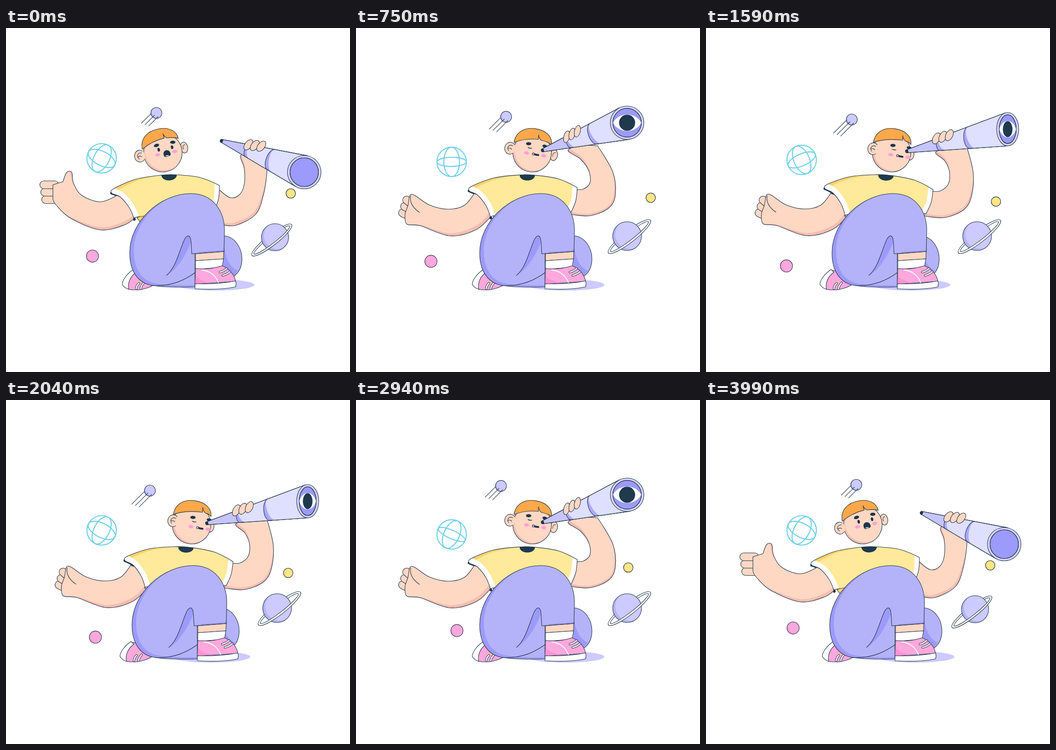
These frames come from a looping animation (748x748 px, 4020 ms). An HTML page with a canvas:

```html
<!DOCTYPE html>
<html lang="en">
<head>
<meta charset="utf-8">
<title>Stargazer</title>
<style>
html, body { margin: 0; width: 100%; height: 100%; overflow: hidden; background: #fff; }
canvas { display: block; width: 100vw; height: 100vh; }
</style>
</head>
<body>
<canvas id="stage" width="748" height="748"></canvas>
<script>
const ctx = document.getElementById('stage').getContext('2d');
const LOOP = 4020, STEP = 30, TAU = Math.PI * 2;
const INK = '#1e3448', NAVY = '#1f3a4d', SKIN = '#ffd8c4', BLUSH = '#f7bdb1', LILAC = '#b4b3f9',
  VIOLET = '#9c9afa', PALE = '#cccaff', PINK = '#ffa8de', YELLOW = '#ffe99a', AMBER = '#ffd36c';
const rad = d => d * Math.PI / 180;

// Pose weights: away = scope lowered, side = turned right, dip = sink between poses
let away, side, dip;
const ease = (t, from, to) => {
  const u = Math.min(1, Math.max(0, (t - from) / (to - from)));
  return u * u * (3 - 2 * u);
};
function setPose(t) {
  away = 1 - ease(t, 30, 530) + ease(t, 3240, 3760);
  side = ease(t, 960, 1440) - ease(t, 2160, 2670);
  dip = 4 * away * (1 - away) + 4 * side * (1 - side);
}
const mix = (down, look, turn = look) => look + away * (down - look) + side * (turn - look);

// Drawing helpers
function paint(path, fill, line = INK, width = 1.1) {
  if (fill) { ctx.fillStyle = fill; ctx.fill(path); }
  if (line) { ctx.strokeStyle = line; ctx.lineWidth = width; ctx.stroke(path); }
}
const draw = (d, fill, line, width) => paint(new Path2D(d), fill, line, width);
function oval(x, y, rx, ry = rx, turn = 0, from = 0, to = TAU) {
  const p = new Path2D();
  p.ellipse(x, y, rx, ry, turn, from, to);
  return p;
}
function local(fn, x = 0, y = 0, turn = 0) {
  ctx.save();
  ctx.translate(x, y);
  ctx.rotate(turn);
  fn();
  ctx.restore();
}
// Smooth line through [x, y] points; listed corners stay sharp
function curve(pts, corners = [], closed = true) {
  const n = pts.length, p = new Path2D();
  const idx = i => closed ? (i + n) % n : Math.min(n - 1, Math.max(0, i));
  const at = i => pts[idx(i)];
  const handle = (i, sign) => at(i).map((v, k) =>
    corners.includes(idx(i)) ? v : v + sign * (at(i + 1)[k] - at(i - 1)[k]) / 6);
  p.moveTo(...at(0));
  for (let i = 0; i < (closed ? n : n - 1); i++)
    p.bezierCurveTo(...handle(i, 1), ...handle(i + 1, -1), ...at(i + 1));
  if (closed) p.closePath();
  return p;
}
// Fill with a shaded rim: the light copy is moved inside the clipped shape
function shaded(path, light, dark, { x = 0, y = 0, turn = 0, pivot = [0, 0] }, extra) {
  local(() => {
    ctx.clip(path);
    paint(path, dark, null);
    local(() => {
      ctx.translate(pivot[0] + x, pivot[1] + y);
      ctx.rotate(turn);
      ctx.translate(-pivot[0], -pivot[1]);
      paint(path, light, null);
    });
    if (extra) extra();
  });
  paint(path);
}

// Floating objects drift on closed orbits
const ball = (x, y, r, light, dark) => shaded(oval(x, y, r), light, dark, { x: r * .18, y: -r * .12 });
const wave = (t, mid, size, phase, turns = 1) => mid + size * Math.cos(TAU * turns * t / LOOP + rad(phase));

function globe(t) {
  const y = wave(t, 288, -4.5, 0, 2), roll = rad(wave(t, 0, 27, 0, 4));
  const flat = 32 * wave(t, .38, .1, 0, 2);
  for (const path of [oval(208, y, 32), oval(208, y, 32, flat, roll), oval(208, y, 17, 32, roll)])
    paint(path, null, '#6ccfe9', 2.2);
}
function comet(t) {
  const x = wave(t, 320, 8, -30), y = wave(t, 191, -8, 38), len = wave(t, 24, -4, 30);
  ball(x, y, 12, PALE, '#aaa7f8');
  for (let i = 0; i < 3; i++)
    draw(`M${x - 12 + 8 * i} ${y + 2 + 3 * i}l${-len} ${len}`);
}
function planet() {
  const r = 31.3 - 2 * dip - 1.8 * away;
  const ring = () => {
    const outer = [0, 0, r * 1.85, r * .4], inner = [0, 0, r * 1.67, r * .25];
    const band = oval(...outer);
    band.addPath(oval(...inner));
    ctx.fillStyle = '#fff';
    ctx.fill(band, 'evenodd');
    paint(oval(...outer));
    paint(oval(...inner));
  };
  const spot = [594.5 - 16.5 * away, 453.5 - 4 * dip + 7.5 * away, rad(-38)];
  local(ring, ...spot);
  ball(589.5 - 4.5 * away, 452.5 + 2.5 * away, r, PALE, LILAC);
  local(() => {
    ctx.beginPath();
    ctx.rect(-80, 0, 160, 40);
    ctx.clip();
    ring();
  }, ...spot);
}
function space(t) {
  globe(t);
  comet(t);
  planet();
  ball(wave(t, 190.5, 29, 95), wave(t, 506, -11.5, 30), 13.3, PINK, '#ff94d4');
  ball(wave(t, 617, -25, 95), wave(t, 368, -9.5, 30), 10.3, '#ffe587', '#ffd569');
}

// Legs and shoes; the squash keeps the soles on the floor
function squash(fn) {
  local(() => {
    ctx.translate(0, 569);
    ctx.scale(1, 1 - .021 * dip);
    ctx.translate(0, -569);
    fn();
  });
}
function lace(d) {
  draw(d, null, INK, 4.6);
  draw(d, null, '#fff', 2.6);
}
function backLeg() {
  paint(oval(455 - 9 * side, 558.5, 85, 12.5), PALE, null);
  local(() => squash(() => {
    draw('M440 452L474 452C498 454 513 478 513 502C513 522 504 534 495 540L440 540Z', LILAC);
    draw('M474 470C476 500 487 521 505 528L495 539L472 539Z', VIOLET, null);
  }), -6 * side);
  local(() => {
    draw('M277 527C268 540 262 555 266 568C285 572 305 568 321 559L288 528Z', PINK);
    draw('M277 525C262 535 252 550 253 558C257 564 262 567 267 568C264 555 270 540 283 531Z', '#fff');
    draw('M285 553Q291 549 297 555', null, AMBER, 1.5);
    lace('M283 567Q284 560 289 555');
    lace('M293 567Q294 560 300 554');
  }, -5 * side);
}
const THIGH = new Path2D('M402 360C336 360 269 420 269 489C269 530 288 556 320 560C345 564 380 564 411 563L411 491L474 486L475 440C475 398 450 360 402 360Z');
function frontLeg() {
  local(() => {
    draw('M412 480L474 480L473 502L412 506Z', SKIN);
    squash(() => {
      shaded(THIGH, LILAC, VIOLET, { x: 9, y: -4 });
      draw('M349 538C370 521 377 483 388 460C394 449 401 448 402 466C393 488 376 523 349 538Z', VIOLET, null);
      draw('M474 486L404 491L402.500 466C401 448 394 449 388 460C377 483 370 521 349 538M320 560C362 562 390 547 411 532');
    });
    draw('M412 506L473 502L470 520L412 525Z', '#fff');
    draw('M412 523C432 525 452 523 470 517C488 524 498 540 499 551L411 557Z', PINK);
    draw('M412 538C420 549 436 554 458 553.500L411.500 556Z', '#ff93d4', null);
    draw('M426 526C446 529 456 539 462 554', null, '#fff', 1.8);
    draw('M411 556C440 557 470 556 499 550C501 555 500 560 499 563C470 569 440 569 411 567Z', '#fff');
    draw('M464 529L468 533M471 536L475 540', null, AMBER, 2);
    lace('M465 531Q473 529 480 523');
    lace('M471 538Q480 536 487 530');
  }, 5 * side);
}

// Arms: key points as [lowered x, y, looking x, y]; turning follows a rule
const pose = (keys, turn) => keys.map(([ax, ay, x, y]) => {
  const [tx, ty] = turn(x, y);
  return [mix(ax, x, x + tx), mix(ay, y, y + ty) + 3.5 * dip];
});
const LEFT_ARM = [
  [241, 364, 257, 360], [205, 378, 235, 386], [165, 364, 200, 394], [147, 338, 160, 385],
  [143, 314, 128, 364], [132, 314, 118, 363], [124, 334, 115, 374], [102, 341, 113, 386],
  [102, 372, 107, 402], [110, 386, 110, 426], [141, 414, 140, 430], [205, 439, 205, 452],
  [258, 428, 262, 438], [283, 410, 296, 406], [275, 378, 290, 372]];
const RIGHT_ARM = [
  [464, 352, 478, 351], [488, 369, 495, 350], [508, 362, 509, 336], [518, 340, 506, 310],
  [518, 305, 488, 285], [510, 278, 461, 266], [530, 270, 490, 254], [567, 295, 525, 256],
  [567, 318, 558, 312], [560, 362, 564, 362], [543, 405, 550, 391], [500, 429, 510, 408],
  [468, 427, 466, 405], [440, 400, 450, 385]];

function leftArm() {
  for (let i = 2; i >= 0; i--) {
    const x = mix(82 + 2 * i, 110 - 4.5 * i, 124 - 4.5 * i), y = mix(341 + 16 * i, 374 + 14 * i) + 3.5 * dip;
    const finger = `M${x} ${y}L${mix(106, 122, 136)} ${y + mix(0, 10)}`;
    draw(finger, null, INK, 18);
    draw(finger, null, SKIN, 15.8);
  }
  const arm = pose(LEFT_ARM, () => [14, -.5]);
  shaded(curve(arm, [0, 6, 7, 8, 13, 14]), SKIN, BLUSH, { turn: -.06, pivot: arm[9] });
  if (away < .5) {
    const [x, y] = arm[5];
    draw(`M${x + 1} ${y + 2}q-4 20 19 36`);
  }
}
function rightArm() {
  const arm = pose(RIGHT_ARM, (x, y) => [10 + 35 * ((410 - y) / 160) ** 2, 4]);
  shaded(curve(arm, [0, 6, 7, 12, 13]), SKIN, BLUSH, { turn: .07, pivot: arm[8] });
}

// Shirt: one shape that slides and tilts with the shoulders
const SHIRT = [[246, 354], [264, 363], [283, 387], [293, 413], [302, 408], [400, 400], [468, 400],
  [478, 375], [481, 347], [440, 328], [389, 320], [355, 319.5], [300, 326], [252, 344]];
function torso() {
  const cuff = curve(SHIRT.slice(0, 4), [], false), rightCuff = curve(SHIRT.slice(6, 9), [], false);
  const tilt = fn => local(() => {
    ctx.translate(370, 340);
    ctx.rotate(.04 * (side - away));
    ctx.translate(-370, -340);
    fn();
  }, 13 * side - 17 * away, 6 * dip);
  tilt(() => paint(cuff, null, INK, 6));
  leftArm();
  rightArm();
  tilt(() => {
    draw('M299 410L328 395L309 424Z', AMBER);
    shaded(curve(SHIRT, [3, 6, 8]), YELLOW, AMBER, { turn: -.075, pivot: SHIRT[11] }, () => {
      paint(cuff, null, '#fff', 23);
      paint(rightCuff, null, '#fff', 21);
      paint(oval(372.5 + 5 * side, 320.5, 16, 10.5), NAVY);
    });
  });
}

// Head, drawn around the face centre; features slide when it turns
function face() {
  const leftEar = mix(-50.5, -49, -41), rightEar = mix(47.5, 47.5, 41);
  paint(oval(rightEar, -2, 8, 12), SKIN);
  draw(`M${rightEar + 3} -8q-7 1 -5 9`);
  shaded(oval(0, 0, 42), SKIN, BLUSH, { x: 4, y: -3 });
  paint(oval(leftEar, -2, 11.5, 13), SKIN, null);
  paint(oval(leftEar, -2, 11.5, 13, 0, rad(50), rad(310)));
  draw(`M${leftEar + 5} -8c-9 -3 -13 6 -7 12M${leftEar - 4} -1q5 -3 8 1`);
  local(features, 11 * side, 2 * side);
  const n = 8 + 10.5 * side;
  draw(`M-42.500 -15.500C-42.500 -40 -24 -52.500 0 -52.500C22 -52.500 38 -42 39 -24Q${30 + 4 * side} -29 ${n + 7} -29.500Q${n + 1} -34 ${n} -40.500L${n + 1} -30.500Q-20 -29 -42.500 -15.500Z`, '#ffa84a');
}
function features() {
  for (const sign of [-1, 1]) {
    paint(oval(7 + 19 * sign, 2.5, 5.5, 3.6), '#ff9fd8', null);
    paint(oval(7.5 + 18 * sign, -18, 5.8, 3.4, rad(8 * sign)), INK, null);
    if (away > .1) paint(oval(7.2 + 14.8 * sign, -7.8, 2.7, 4), INK, null);
  }
  if (away <= .1) draw('M-10.500 -9.500q4 1.500 8 0', null, INK, 1.5);
  if (away > .5) {
    draw('M1 6C0 0 4 -4 9 -3.500C14 -3 17 2 16 7C15 11 10 9 6 10.500C3 11 1 9 1 6Z', INK, null);
    draw('M3.500 8.500C7 6.500 10 7 12.500 8.800C9 8.600 6 10 3.500 8.500Z', '#fff', null);
  } else {
    draw('M3 2.200q6 1.500 11 1', null, INK, 4);
    paint(oval(3, 2.5, 2.4), PINK, INK, 1);
  }
}

// Telescope and gripping fingers
function scope() {
  const tip = [mix(469, 406, 437), mix(245.5, 266, 268) + 6 * dip];
  const lens = [mix(648.5, 589.5, 656), 206 + 107.5 * away ** 1.5 + 14 * side + 8 * dip];
  const rx = 36.5 - 12.5 * side, ry = 36.3;
  const axis = Math.atan2(lens[1] - tip[1], lens[0] - tip[0]);
  // Point on the barrel edge: k runs from tip to lens, sign picks the side
  const edge = (k, sign) => {
    const n = axis + sign * (Math.PI / 2 + .165), dir = [Math.cos(n), Math.sin(n)];
    const m = Math.hypot(rx * dir[0], ry * dir[1]);
    return [rx, ry].map((r, i) => {
      const near = tip[i] + 3.3 * dir[i], far = lens[i] + r * r * dir[i] / m;
      return near + k * (far - near);
    });
  };
  // Barrel from a rounded joint to the lens; the joint may lean from k to k2
  const barrel = (k, k2, bulge) => {
    const a = edge(k, -1), b = edge(k2, 1), w = Math.hypot(a[0] - b[0], a[1] - b[1]) * bulge;
    const ox = -Math.cos(axis) * w, oy = -Math.sin(axis) * w;
    return `M${a}C${a[0] + ox} ${a[1] + oy} ${b[0] + ox} ${b[1] + oy} ${b}L${edge(1, 1)}L${edge(1, -1)}Z`;
  };
  draw(barrel(0, 0, .6), '#c6c4fd');
  for (const k of [.33, .63]) {
    draw(barrel(k, k, .36), '#aba8f8');
    draw(barrel(k, k + .05, .3), '#dfdfff', null);
  }
  draw(`M${edge(0, -1)}L${edge(1, -1)}M${edge(0, 1)}L${edge(1, 1)}`);
  paint(oval(...tip, 2.3, 3.6, axis), INK);
  paint(oval(...lens, rx, ry), '#d6d5ff');
  const glass = oval(...lens, rx - 5.5, ry - 5);
  paint(glass, VIOLET);
  local(() => {
    ctx.clip(glass);
    ctx.translate(lens[0] - 115 * away, lens[1]);
    ctx.scale((rx - 5.5) / 31, 1);
    draw('M-31 0C-17 -24 17 -24 31 0C17 24 -17 24 -31 0Z', '#fff', null);
    paint(oval(0, 0, 17.5), NAVY, null);
  });
  paint(glass, null);
}
function fingers() {
  for (let i = 0; i < 3; i++) {
    const x = mix(527, 458, 501) + i * mix(14, 11.7, 14);
    const y = mix(254, 236.5, 240) + i * mix(1.5, -6, -3.5) + 2 * dip;
    paint(oval(x, y, mix(7.5, 6.3, 7.5), 13, rad(mix(38, 14, 27))), SKIN);
  }
}

function render(now) {
  const t = Math.floor(now % LOOP / STEP) * STEP;
  setPose(t);
  ctx.fillStyle = '#fff';
  ctx.fillRect(0, 0, 748, 748);
  ctx.lineCap = ctx.lineJoin = 'round';
  backLeg();
  space(t);
  torso();
  frontLeg();
  local(face, mix(341, 383, 403.5), 271 + 7.5 * dip, rad(mix(-11, 9)));
  scope();
  fingers();
}
const start = performance.now();
(function loop() {
  render(performance.now() - start);
  requestAnimationFrame(loop);
})();
</script>
</body>
</html>
```
